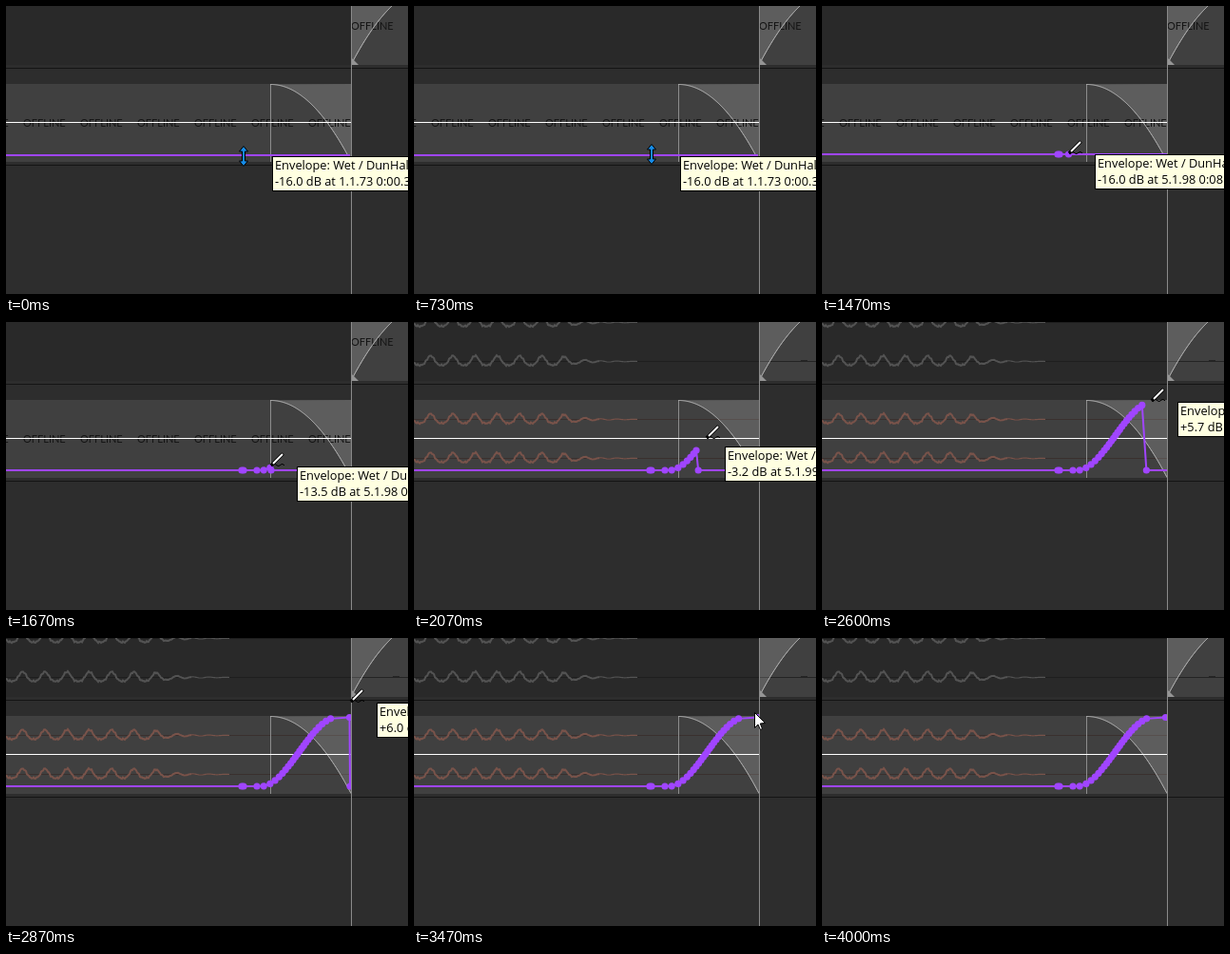
An HTML page with a canvas that plays this animation: 423 px wide and 303 px high, repeating every 4990 ms.

```html
<!DOCTYPE html>
<html lang="en">
<head>
<meta charset="utf-8">
<title>Envelope drawing</title>
<style>
html, body { margin: 0; width: 100%; height: 100%; overflow: hidden; background: #2d2d2d; }
canvas { display: block; }
</style>
</head>
<body>
<canvas id="stage" width="423" height="303"></canvas>
<script>
const ctx = document.getElementById('stage').getContext('2d');
const LOOP = 4990, TICKS_PER_MS = 0.015;
const PURPLE = '#a045ff', EDGE = 363, BASE = 156, TOP = 83.5;

// Ticks at which the scene switches
const NUDGE = 11, PENCIL = 14, DRAW = 22, ONLINE = 27, RELEASE = 47, LEAVE = 52, GONE = 60;

const clamp = (v, lo = 0, hi = 1) => Math.min(hi, Math.max(lo, v));
const mix = (a, b, u) => a + (b - a) * u;

function rect(color, x, y, w, h) {
  ctx.fillStyle = color;
  ctx.fillRect(x, y, w, h);
}

function trace(list) {
  ctx.beginPath();
  list.forEach(([x, y]) => ctx.lineTo(x, y));
}

function line(list, color, width = 1) {
  trace(list);
  ctx.strokeStyle = color;
  ctx.lineWidth = width;
  ctx.stroke();
}

function shape(list, fill, stroke) {
  trace(list);
  ctx.closePath();
  ctx.fillStyle = fill;
  ctx.fill();
  if (stroke) {
    ctx.strokeStyle = stroke;
    ctx.lineWidth = 1;
    ctx.stroke();
  }
}

function text(str, x, y, font, color) {
  ctx.font = font;
  ctx.fillStyle = color;
  ctx.fillText(str, x, y);
}

function plot(x0, x1, f) {
  const list = [];
  for (let x = x0; x <= x1; x++) list.push([x, f(x)]);
  return list;
}

// Pointer: rests, then draws up a diagonal through a few timed stops
const stops = [[21, 253], [25, 279], [31, 308], [36, 335], [43, 363]];

function pointer(tick) {
  const i = clamp(stops.findIndex(s => s[0] > tick), 1, stops.length - 1);
  const [t0, x0] = stops[i - 1], [t1, x1] = stops[i];
  const x = tick >= 43 ? EDGE : mix(x0, x1, clamp((tick - t0) / (t1 - t0)));
  return [x, Math.min(tick < NUDGE ? 158 : 156, 431 - x)];
}

// The drawn end trails the pencil, most of all in mid stroke
function headX(tick) {
  const x = pointer(tick)[0];
  return x - 2 - 10 * Math.sin(Math.PI * clamp((x - 279) / 84));
}

const rise = x => clamp((x - 269) / 79);

function curveY(x) {
  const u = rise(x);
  return mix(BASE, TOP, u * u * (3 - 2 * u));
}

// Points lie closer together where the curve is steeper
function envelopePoints() {
  const xs = [248, 250];
  for (let x = 264; x < 345; ) {
    xs.push(x);
    const u = rise(x);
    x += 2.2 + 5 * (1 - 4 * u * (1 - u));
  }
  return [...xs, 361.5].map(x => [x, curveY(x)]);
}
const points = envelopePoints();

function levelText(tick) {
  const y = tick < DRAW ? BASE : curveY(headX(tick));
  const gain = mix(10 ** (-16 / 20), 10 ** (6 / 20), (BASE - y) / (BASE - TOP));
  const level = 20 * Math.log10(gain);
  return (level > 0 ? '+' : '') + level.toFixed(1) + ' dB';
}

function wave(center, color, axis) {
  rect(axis, 0, center, EDGE, 1);
  const f = x => {
    const fade = 1 / (1 + Math.exp((x - 170) / 7));
    const a = 2 * Math.PI * (x - 17.5) / 23.4;
    const hum = 5 * Math.cos(a) + Math.cos(2 * a) + Math.sin(x * 1.9) * Math.sin(x * 0.37);
    const rest = Math.sin(x * 0.36) * clamp((240 - x) / 50);
    return center + 0.5 - fade * hum - (1 - fade) * rest * 0.8;
  };
  line(plot(0, 195, f), color, 2);
  line(plot(195, 235, f), color, 1.2);
}

const fadeOut = plot(278.5, EDGE, x => 82.5 + 81 * ((x - 278.5) / 84.5) ** 2);
const fadeIn = plot(EDGE + 0.5, 423, x => 62 - 82 * (1 - (1 - (x - EDGE) / 85) ** 2));

function tracks(online) {
  rect('#2d2d2d', 0, 0, 423, 303);
  rect('#292929', 0, 0, EDGE, 62);
  rect('#404040', EDGE, 0, 60, 62);
  rect('#404040', 0, 82, EDGE, 82);

  if (online) {
    for (const y of [0, 41]) wave(y, '#535353', '#1e1e1e');
    for (const y of [102, 143]) wave(y, '#79534a', '#3a302e');
    rect('#242424', EDGE, 41, 60, 1);
    rect('#242424', 407, 40, 7, 2);
  }
  const veil = 'rgba(255,255,255,.15)';
  shape([...fadeIn, [EDGE, -20]], veil);
  shape([...fadeOut, [EDGE, 163.5], [EDGE, 82]], veil);

  if (!online) {
    const font = '11px Lato, sans-serif';
    for (let x = -42; x < EDGE; x += 60) text('OFFLINE', x, 127, font, '#141414');
    text('OFFLINE', EDGE, 25, font, '#141414');
  }
  line([[278.5, 82], [278.5, 164]], '#8c8c8c');
  line([...fadeOut, [EDGE, 163.5]], '#bdbdbd');
  line(fadeIn, '#c4c4c4');
  shape([[364, 55], [371, 62], [364, 62]], '#959595');
  rect('#141414', 0, 65, 423, 1);
  rect('#141414', 0, 167, 423, 1);
  rect('#fff', 0, 122, EDGE, 1);
}

function envelope(tick) {
  if (tick < DRAW) {
    rect(PURPLE, 0, BASE, EDGE - 1, 2);
    return;
  }
  const head = headX(tick);
  const dots = points.filter(p => p[0] <= head + 1);
  const path = [[0, BASE], ...dots];
  if (tick < RELEASE) {
    const drop = [Math.min(head + 2, 362), BASE];
    dots.push(drop);
    path.push(drop, [EDGE, BASE]);
  }
  ctx.save();
  ctx.beginPath();
  ctx.rect(0, 0, EDGE + 1, 303);
  ctx.clip();
  line(path, PURPLE, 2);
  ctx.fillStyle = PURPLE;
  for (const [x, y] of dots) {
    ctx.beginPath();
    ctx.arc(x, y, 3.6, 0, 7);
    ctx.fill();
  }
  ctx.restore();
}

function tooltip(tick) {
  // Trails the pencil while the stroke picks up speed
  const lag = 1.6 * Math.max(0, Math.sin(Math.PI * (tick - 25) / 11));
  const [px, py] = pointer(tick - lag);
  const x = Math.round(px) + 27, y = Math.round(py);
  const place = tick < DRAW ? '1.1.73 0:00.360' : tick < 29 ? '5.1.98 0:08.490' : '5.1.99 0:08.495';
  const font = '12.8px "Open Sans", sans-serif';
  rect('#000', x, y, 220, 37);
  rect('#ffffe1', x + 1, y + 1, 218, 35);
  text('Envelope: Wet / DunHalo', x + 3, y + 14, font, '#000');
  text(levelText(tick) + ' at ' + place, x + 3, y + 31, font, '#000');
}

function resizeCursor() {
  const half = [[0, -10.5], [4.5, -5], [1.5, -5], [1.5, 5], [4.5, 5], [0, 10.5]];
  const mirror = half.slice(1, -1).reverse().map(([x, y]) => [-x, y]);
  shape([...half, ...mirror], '#168be8', '#000');
}

function pencilCursor() {
  line(plot(0, 14, x => -0.5 - Math.sin(x * 0.8 - 1.4)), '#000');
  line([[0, 0], [12.5, -12.5]], '#000', 3.8);
  line([[2, -2], [12, -12]], '#fff', 2);
}

function arrowCursor() {
  shape([[0.5, 0.5], [0.5, 16.5], [4, 13], [6.5, 18.5], [8.5, 17.5], [6.3, 12], [11.5, 11.5]], '#fff', '#000');
}

function cursor(tick) {
  if (tick >= GONE) return;
  let [x, y] = pointer(tick), draw = pencilCursor;
  if (tick < PENCIL) {
    x -= 3;
    draw = resizeCursor;
  } else if (tick >= LEAVE) {
    const u = (tick - LEAVE) / (GONE - 1 - LEAVE);
    x = mix(358, 215, u);
    y = mix(78, 293, u);
    draw = arrowCursor;
  } else {
    y -= 1;
  }
  ctx.save();
  ctx.translate(Math.round(x), Math.round(y));
  draw();
  ctx.restore();
}

function render(ms) {
  // Small offset keeps ticks aligned with 10 ms time steps
  const tick = Math.floor((ms + 4) * TICKS_PER_MS);
  tracks(tick >= ONLINE);
  envelope(tick);
  rect('#8a8a8a', EDGE, 0, 1, 303);
  if (tick < LEAVE) tooltip(tick);
  cursor(tick);
}

const start = performance.now();
function frame() {
  render((performance.now() - start) % LOOP);
  requestAnimationFrame(frame);
}
frame();
</script>
</body>
</html>
```
